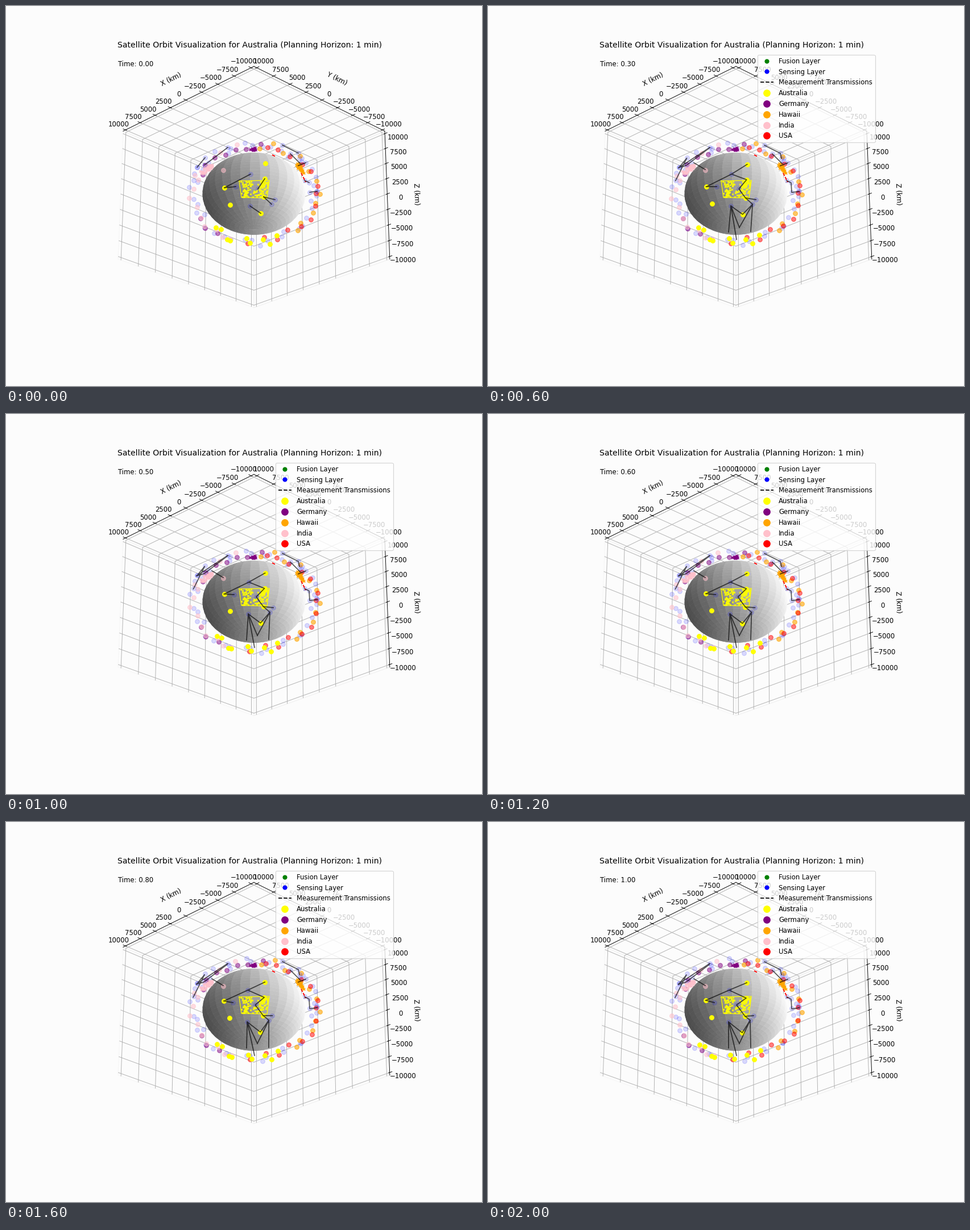
Animation, 837 px wide and 669 px high, one loop 2200 ms. Source, as a matplotlib script:

```python
import matplotlib.pyplot as plt
import numpy as np
from matplotlib.animation import FuncAnimation
from matplotlib.lines import Line2D
from matplotlib.transforms import Affine2D

W, H = 837, 669
DPI = H / 8
STEPS = 11
BG = "#fcfcfc"
CENTER = np.array([436, 330])
SHELL = np.array([116, -93])  # satellite shell as seen on the stage
rng = np.random.default_rng(4)

# Arcs of satellites around the limb: from, to (degrees), count, direction.
ARCS = {
    "blue": [(0, 350, 20, 1), (8, 358, 20, -1)],
    "purple": [(86, 155, 7, -1), (209, 234, 3, 1)],
    "pink": [(108, 160, 4, 1), (165, 250, 9, 1)],
    "orange": [(84, -48, 12, -1)],
    "red": [(77, -95, 14, 1)],
    "yellow": [(225, 294, 9, 1)],
}
ALPHA = {"blue": 0.14, "yellow": 1, "pink": 0.55, "orange": 0.6}

# Satellites in front of the globe.
FUSION = np.array([(384, 320), (455, 304), (453, 336), (448, 365),
                   (456, 277), (394, 350)])
SENSING = np.array([(430, 296), (443, 322), (467, 349), (429, 352),
                    (404, 318), (473, 341)])

# Transmission paths near the limb and the drift they share.
LEFT = [[(390, 249), (349, 280), (336, 284)],
        [(336, 284), (350, 267), (330, 307)]]
RIGHT = [[(486, 245), (514, 259), (516, 268)], [(500, 260), (517, 277)],
         [(514, 281), (527, 276)],
         [(525, 307), (533, 311), (534, 328), (547, 326)]]
GROUND = [(423, 398), (437, 411), (442, 390), (462, 397)]


def fusion_at(t):
    rise = np.where(FUSION[:, 0] > 430, 6, -6)
    return FUSION + t * np.column_stack([-np.ones(len(FUSION)), rise])


def sensing_at(t):
    return SENSING + t * np.array([-6, 0])


def paths_at(step):
    t = step / (STEPS - 1)
    fuse, sense = fusion_at(t), sensing_at(t)
    chain = np.stack([fuse[:4], sense[:4]], axis=1).reshape(-1, 2)
    paths = [chain, [fuse[0], sense[4]], [fuse[2], sense[5]]]
    paths += [np.array(p) + t * np.array([-1, 2]) for p in LEFT]
    paths += [np.array(p) + t * np.array([0, 1]) for p in RIGHT]
    if step == 0:  # only every other hop is up at the start
        return [p[i:i + 2] for p in paths for i in range(0, len(p) - 1, 2)]
    paths += [[sense[0], fuse[4]]]
    paths += [[sense[3], g] for g in GROUND[:3]]
    paths += [[sense[2], g] for g in GROUND[2:]]
    if step < 3:
        paths.append([(544, 296), (548, 316)])
    else:
        paths += [[(390, 249), (335, 285)], [(362, 276), (382, 288)]]
    return paths


fig = plt.figure(figsize=((W + 1e-6) / DPI, 8), dpi=DPI, facecolor=BG)
ax = fig.add_subplot(projection="3d", computed_zorder=False, facecolor=BG)
ax.view_init(elev=-25, azim=135)
limit = 10000 * 25 / 24
ticks = np.arange(-10000, 10001, 2500)
ax.set(xlim=(-limit, limit), ylim=(-limit, limit), zlim=(-limit, limit),
       xticks=ticks, yticks=ticks, zticks=ticks,
       xlabel="X (km)", ylabel="Y (km)", zlabel="Z (km)")
for axis in (ax.xaxis, ax.yaxis, ax.zaxis):
    axis.pane.fill = False
ax.set_title("Satellite Orbit Visualization for Australia "
             "(Planning Horizon: 1 min)")
clock = ax.text2D(0.05, 0.95, "", transform=ax.transAxes)

u = np.linspace(0, 2 * np.pi, 100)
v = np.linspace(0, np.pi, 100)
R = 5680
ax.plot_surface(R * np.outer(np.cos(u), np.sin(v)),
                R * np.outer(np.sin(u), np.sin(v)),
                R * np.outer(np.ones(100), np.cos(v)),
                color="white", rcount=34, ccount=34, zorder=3)

stage = Affine2D().scale(1 / W, -1 / H).translate(0, 1) + fig.transFigure


def mark(xy, zorder, **style):
    x, y = np.array(xy, float).reshape(-1, 2).T
    line = Line2D(x, y, transform=stage, zorder=zorder, **style)
    ax.add_artist(line)
    return line


def dots(xy, color, zorder):
    return mark(xy, zorder, ls="", marker="o", ms=6.6, mew=1, color=color,
                alpha=ALPHA.get(color, 0.5))


def arc(start, end, count, turn):
    angle = np.linspace(start, end, count) + rng.uniform(-3, 3, count)
    return np.radians(angle), rng.uniform(0.84, 1, count), turn


def arc_at(angle, reach, turn, t):
    a = angle + turn * t * 0.038
    return CENTER + SHELL * (reach * np.array([np.cos(a), np.sin(a)])).T


rings = []
for color, spans in ARCS.items():
    for span in spans:
        rings.append((arc(*span), dots([], color, 2)))
fusion = dots(FUSION, "yellow", 4.1)
sensing = dots(SENSING, "blue", 4)
dots([(382, 289)], "pink", 4)
dots(np.vstack(LEFT + RIGHT), "blue", 2)


def targets(xy, color, size=3):
    mark(xy, 4.5, ls="", marker="x", ms=size, mew=1, color=color)


# Ground targets: a bounded patch in front, narrow bands at the limb.
mark([(410, 308), (463, 307), (459, 338), (414, 337), (410, 308)], 4.4,
     color="yellow", lw=1.1)
for cx, cy, n in [(424, 314, 26), (420, 329, 28), (454, 314, 38),
                  (448, 330, 28)]:
    x = np.clip(rng.normal(cx, 5, n), 413, 460)
    y = np.clip(rng.normal(cy, 5, n), 309, 336)
    targets(np.column_stack([x, y]), "yellow", 2.3)


def band(start, end, width, n, color):
    start, end = np.array(start), np.array(end)
    t = rng.uniform(0, 1, (n, 1))
    targets(start + t * (end - start) + rng.normal(0, width, (n, 2)), color)


band((511, 278), (522, 292), 1.5, 50, "orange")
band((345, 294), (364, 279), 2.0, 45, "pink")
band((432, 252), (438, 253), 1.3, 22, "purple")
for path in ([(519, 294), (527, 310)], [(468, 262), (474, 265)]):
    mark(path, 4.3, color="red", lw=1.6, ls=(0, (3, 1.2)))

links = mark([], 5, color="black", lw=1.5, alpha=0.65)


def key(color, size):
    return Line2D([], [], ls="", marker="o", ms=size, color=color, mew=0)


entries = {"Fusion Layer": key("green", 7), "Sensing Layer": key("blue", 7),
           "Measurement Transmissions": Line2D([], [], color="k", ls="--")}
for name, color in [("Australia", "yellow"), ("Germany", "purple"),
                    ("Hawaii", "orange"), ("India", "pink"), ("USA", "red")]:
    entries[name] = key(color, 11)
legend = ax.legend(entries.values(), entries.keys(), loc="upper right")
legend.set_zorder(10)


def draw(step):
    t = step / (STEPS - 1)
    for ring, line in rings:
        line.set_data(*arc_at(*ring, t).T)
    fusion.set_data(*fusion_at(t).T)
    sensing.set_data(*sensing_at(t).T)
    gap = [(np.nan, np.nan)]
    links.set_data(*np.vstack([q for p in paths_at(step) for q in (p, gap)]).T)
    clock.set_text(f"Time: {t:.2f}")
    legend.set_visible(step > 0)


anim = FuncAnimation(fig, draw, frames=STEPS, interval=200,
                     init_func=lambda: draw(0), repeat=True)
plt.show()
```
